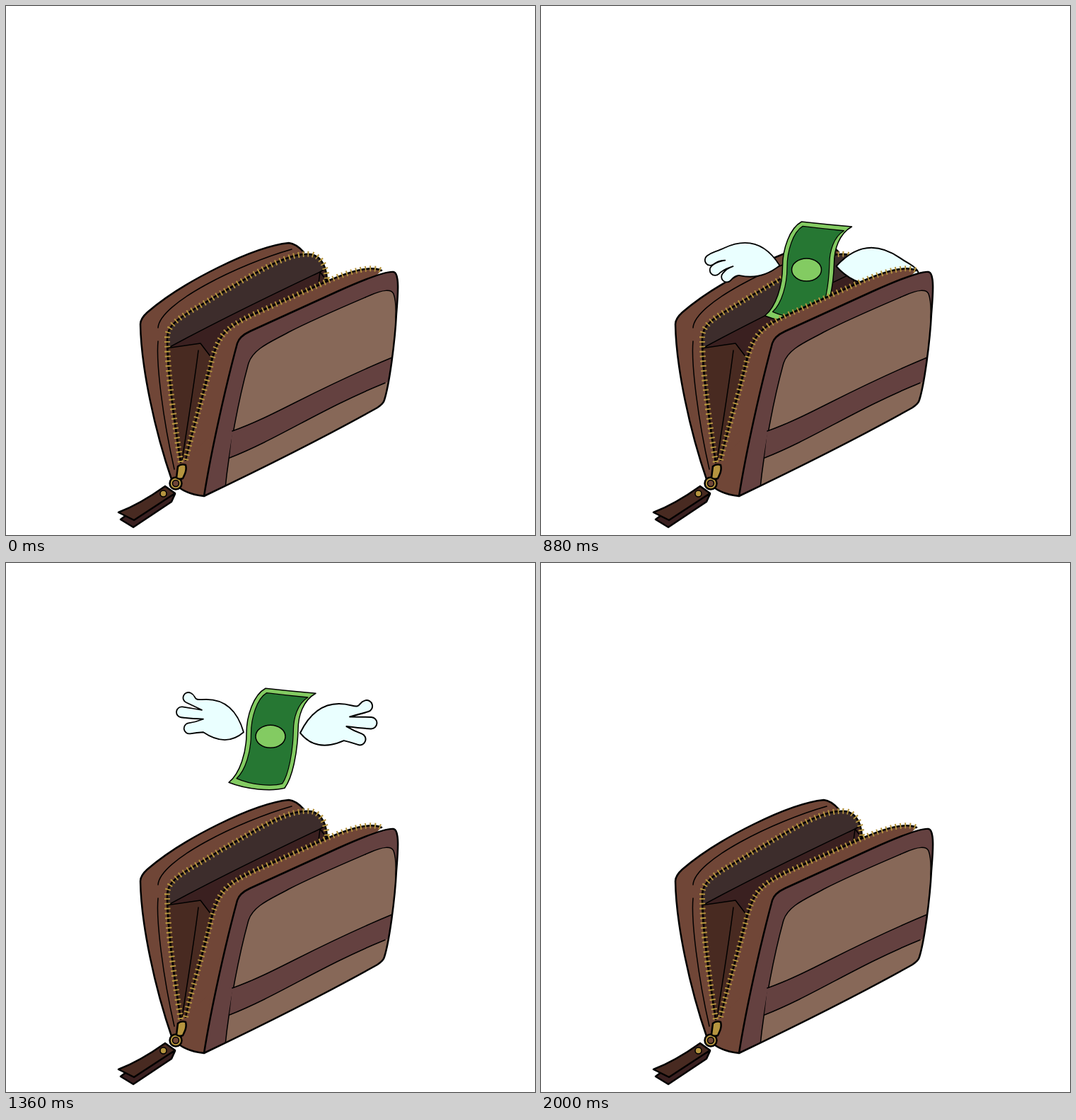
Animation, 748 px wide and 748 px high, one loop 2.4 s. Source, as an HTML page:

```html
<!DOCTYPE html>
<html lang="en">
<head>
<meta charset="utf-8">
<title>Money flies away</title>
<style>
  html, body { margin: 0; height: 100%; overflow: hidden; background: #fff; }
  svg { display: block; width: 100vw; height: 100vh; stroke-linejoin: round; stroke-linecap: round; fill: none; }
  .edge { stroke: #000; stroke-width: 2.5; }
  .thin { stroke: #000; stroke-width: 1.5; }
  .teeth { stroke: #b6953f; stroke-width: 8; stroke-dasharray: 2 4.8; stroke-linecap: butt; }
  .brown { fill: #704637; }
  .plum { fill: #644140; }
  .tan { fill: #876858; }
  .hide { fill: #482a21; }
  .gold { fill: #b6953f; }
  .dark { fill: #3a2020; }
  .lime { fill: #83cb62; }
  .green { fill: #267733; }
  .wing { fill: #eaffff; stroke: #000; stroke-width: 1.8; }
</style>
</head>
<body>
<svg viewBox="0 0 748 748">
  <defs>
    <path id="backZip" d="M247 645C240 600 228 520 228 470C227 445 260 434 300 408C340 386 390 352 422 351C443 348 453 365 454 388"/>
    <path id="frontZip" d="M254 642C262 605 278 555 289 510C299 465 310 455 350 436L450 391Q510 364 531 374"/>
    <path id="front" d="M280 693C290 630 310 540 327 477Q330 467 345 460L470 403Q535 374 548 376C557 378 554 410 552 435C550 475 542 535 535 557Q534 562 525 568C450 610 370 650 280 693Z"/>
    <path id="bill" d="M367 0Q403 4 438 7C420 17 413 39 413 59C412 92 405 126 394 141C375 146 340 143 315 133C331 120 340 90 340 64C340 39 350 9 367 0Z"/>
    <path id="wing" class="wing"/>
    <clipPath id="inBack"><use href="#backZip"/></clipPath>
    <clipPath id="inFront"><use href="#front"/></clipPath>
  </defs>

  <!-- back half and lining -->
  <path class="brown edge" d="M280 693Q250 690 235 672C210 600 191 510 190 450Q190 442 200 433C250 390 350 340 400 335Q410 336 421 348"/>
  <path class="thin" d="M215 455C217 420 330 365 404 344M215 474C212 505 222 585 238 655"/>
  <use class="dark" href="#backZip"/>
  <g clip-path="url(#inBack)">
    <path fill="#3d2d2c" class="thin" d="M210 494C300 444 400 397 444 376L470 360 400 320 200 400Z"/>
    <path class="thin" d="M444 376L442 392M444 376L453 388"/>
  </g>
  <use class="edge" href="#backZip"/>
  <use class="teeth" href="#backZip"/>

  <g id="money">
    <use href="#wing" transform="translate(336 62) scale(-1 1)"/>
    <use href="#wing" transform="translate(416 63) rotate(10) scale(1.1)"/>
    <use class="lime thin" href="#bill"/>
    <use class="green thin" href="#bill" transform="translate(376 71) scale(.82 .91) translate(-376 -71)"/>
    <ellipse class="lime thin" cx="374" cy="68" rx="21" ry="16"/>
  </g>

  <!-- side fold, then the zip edge it meets -->
  <g clip-path="url(#inBack)">
    <path class="hide thin" d="M220 485L275 477 291 498 254 642 220 650Z"/>
    <path class="thin" d="M272 487C266 535 257 590 249 642"/>
  </g>
  <g clip-path="url(#belowFold)">
    <use class="edge" href="#backZip"/>
    <use class="teeth" href="#backZip"/>
  </g>
  <clipPath id="belowFold"><path d="M200 484H260V660H200Z"/></clipPath>

  <!-- front half -->
  <use class="brown" href="#frontZip"/>
  <use class="edge" href="#frontZip"/>
  <use class="teeth" href="#frontZip"/>
  <use class="plum" href="#front"/>
  <g clip-path="url(#inFront)">
    <path class="tan thin" d="M310 682C315 630 329 555 343 505C350 484 375 475 400 461C435 443 480 424 515 409C533 401 545 400 548 407Q552 418 551 440L570 600 310 720Z"/>
    <path class="plum" d="M320 601C380 580 430 545 546 497H560V523L536 533C445 570 385 612 316 639Z"/>
    <path class="thin" d="M320 601C380 580 430 545 546 497M536 533C445 570 385 612 316 639"/>
  </g>
  <use class="edge" href="#front"/>

  <!-- zip pull -->
  <path class="dark edge" d="M170 720L162 726 180 737 234 701 239 690Z"/>
  <path class="hide edge" d="M159 716Q190 704 225 679L239 689 181 727Z"/>
  <circle class="gold thin" cx="222.5" cy="689.5" r="4.5"/>
  <circle class="gold edge" cx="240" cy="675" r="8.5"/>
  <circle class="brown thin" cx="240" cy="675" r="4.5"/>
  <path class="gold edge" d="M243 651Q248 647 254 649C256 656 253 662 250 668Q245 670 241 667Z"/>
</svg>
<script>
const LOOP = 2400, STEP = 80, FIRST = 5, COUNT = 20, TIP = 7.5;
const money = document.getElementById('money');
const wing = document.getElementById('wing');
const mix = (a, b, t) => a + (b - a) * t;
const polar = (length, degrees) => {
  const angle = degrees * Math.PI / 180;
  return [length * Math.cos(angle), length * Math.sin(angle)];
};
const add = (p, q, k = 1) => [p[0] + q[0] * k, p[1] + q[1] * k];

// Points turn about the wing root: length and angle when raised, then when lowered.
const SHOULDER = [52, -74, 60, -42], ARM = [75, -38, 90, 3], BELLY = [33, 41, 34, 36];
const FEATHERS = [
  { tip: [92, -32, 105, 23], notch: [67, -28, 88, 17] },
  { tip: [92, -18, 91, 26], notch: [60, -18, 72, 20] },
  { tip: [77, -4, 76, 28], notch: [57, 0, 59, 28] }
];

function wingPath(drop) {
  const at = ([l0, a0, l1, a1]) => polar(mix(l0, l1, drop), mix(a0, a1, drop));
  const shoulder = at(SHOULDER), arm = at(ARM);
  let from = add(arm, add(arm, shoulder, -1), 0.3);
  let d = `M0 0Q${shoulder} ${arm}`;
  FEATHERS.forEach(({ tip, notch }, i) => {
    const heading = mix(17 * i - 25, 100 - 5 * i, drop);
    const back = polar(-10, heading), side = polar(TIP, heading + 90);
    const near = add(at(tip), side, -1), far = add(at(tip), side);
    d += `C${from} ${add(near, back)} ${near}A${TIP} ${TIP} 0 0 1 ${far}`;
    from = at(notch);
    d += `Q${add(far, back)} ${from}`;
  });
  return `${d}Q${at(BELLY)} 0 0Z`;
}

function draw() {
  const step = Math.floor(performance.now() % LOOP / STEP) - FIRST;
  const visible = step >= 0 && step < COUNT;
  money.style.display = visible ? '' : 'none';
  if (visible) {
    const y = 444 - 24.1 * step + 0.156 * step ** 2;
    money.setAttribute('transform', `translate(${(12 - step) / 4} ${y})`);
    money.setAttribute('opacity', Math.min(1, ((COUNT - step) / 8) ** 1.4));
    wing.setAttribute('d', wingPath((1 + Math.cos(Math.PI * step / 4)) / 2));
  }
  requestAnimationFrame(draw);
}
draw();
</script>
</body>
</html>
```
